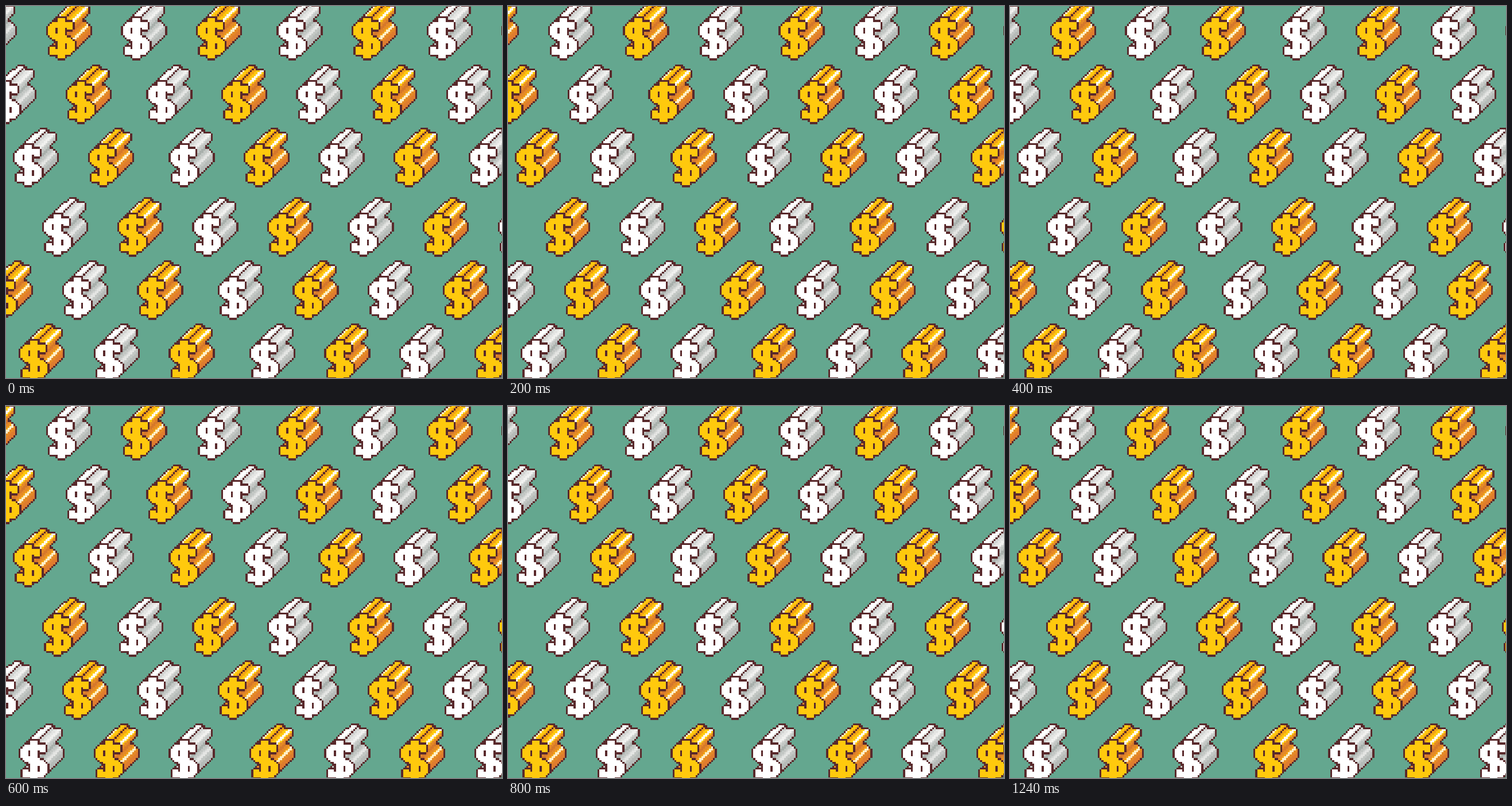
Recreate the animation shown at these times as an HTML page with a canvas. Size 864x648 px, loop 1.4 s.

```html
<!DOCTYPE html>
<html lang="en">
<head>
<meta charset="utf-8">
<title>Dollar pattern</title>
<style>
html, body { margin: 0; width: 100%; height: 100%; overflow: hidden; background: #64a78f; }
canvas { display: block; width: 864px; height: 648px; }
</style>
</head>
<body>
<canvas id="stage" width="864" height="648"></canvas>
<script>
const ctx = document.getElementById('stage').getContext('2d');
const CELL = 864 / 258, COLS = 24, ROWS = 31, DEPTH = 8;
const BACK = '#64a78f', DARK = '#59292b';

// Shades run along the diagonals x + y: [last diagonal, gold, silver]
const shades = [
  [14, '#fff0c8', '#ffffff'],
  [16, '#ffc90d', '#ffffff'],
  [17, '#f3a414', '#e4e5e3'],
  [18, DARK, DARK],
  [20, '#f3a414', '#d3d5d3'],
  [22, '#ffc90d', '#e4e5e3'],
  [24, '#fffaf0', '#f1f1ef'],
  [25, '#ffc90d', '#d3d5d3'],
  [27, '#e58a26', '#c3c7c4'],
  [29, '#d6782b', '#a9b0ac'],
  [31, '#e58a26', '#c3c7c4'],
  [32, '#f3a414', '#d3d5d3'],
  [34, '#fff0c8', '#e4e5e3'],
  [36, '#e58a26', '#c3c7c4'],
  [99, '#df7c2e', '#b6bbb8']
];
const faceColors = ['#ffc90d', '#ffffff'];

// Upper half of the sign; the lower half is its point reflection
const halfSign = [
  [6, 9, 4, 11], [3, 11, 11, 1], [2, 12, 12, 1], [1, 13, 13, 1],
  [1, 14, 4, 4], [11, 14, 3, 1], [1, 17, 9, 1], [2, 18, 9, 1], [3, 19, 10, 1]
];

const key = (x, y) => y * 64 + x;
const face = new Set(), body = new Set();
for (const [x0, y0, w, h] of halfSign)
  for (let y = y0; y < y0 + h; y++)
    for (let x = x0; x < x0 + w; x++)
      face.add(key(x, y)).add(key(15 - x, 38 - y));
for (const k of face)
  for (let d = 0; d <= DEPTH; d++) body.add(k + d - 64 * d);

const touches = (set, x, y) =>
  [[1, 0], [-1, 0], [0, 1], [0, -1]].some(([dx, dy]) => set.has(key(x + dx, y + dy)));

function colorAt(x, y, metal) {
  const k = key(x, y);
  if (face.has(k)) return faceColors[metal];
  if (touches(face, x, y)) return DARK;
  if (body.has(k)) return shades.find(s => x + y <= s[0])[metal + 1];
  return touches(body, x, y) ? DARK : null;
}

function drawSign(left, top, metal) {
  for (let y = 0; y < ROWS; y++)
    for (let x = 0; x < COLS; x++) {
      const color = colorAt(x, y, metal);
      if (!color) continue;
      const x1 = Math.round(left + x * CELL), y1 = Math.round(top + y * CELL);
      ctx.fillStyle = color;
      ctx.fillRect(x1, y1,
        Math.round(left + (x + 1) * CELL) - x1,
        Math.round(top + (y + 1) * CELL) - y1);
    }
}

// Each line: first x, y, index after which the wider gap applies, first metal
const lines = [
  [-61, -9, 4, 1], [-27, 102, 2, 1], [12, 212, 2, 1],
  [63, 333, 4, 1], [-33, 443, 3, 0], [22, 553, 3, 0]
];

function drawPattern(swap) {
  ctx.fillStyle = BACK;
  ctx.fillRect(0, 0, 864, 648);
  for (const [x, y, gap, first] of lines)
    for (let i = 0; i < 8; i++)
      drawSign(x + CELL * (39 * i + (i >= gap ? 3 : 0)), y, (first + i + swap) % 2);
}

let shown = -1;
function update(now) {
  const step = Math.min(5, Math.floor(now % 1400 / 200)), swap = step % 2;
  if (swap !== shown) drawPattern(shown = swap);
}

const start = performance.now();
function tick() {
  update(performance.now() - start);
  requestAnimationFrame(tick);
}
tick();
</script>
</body>
</html>
```
